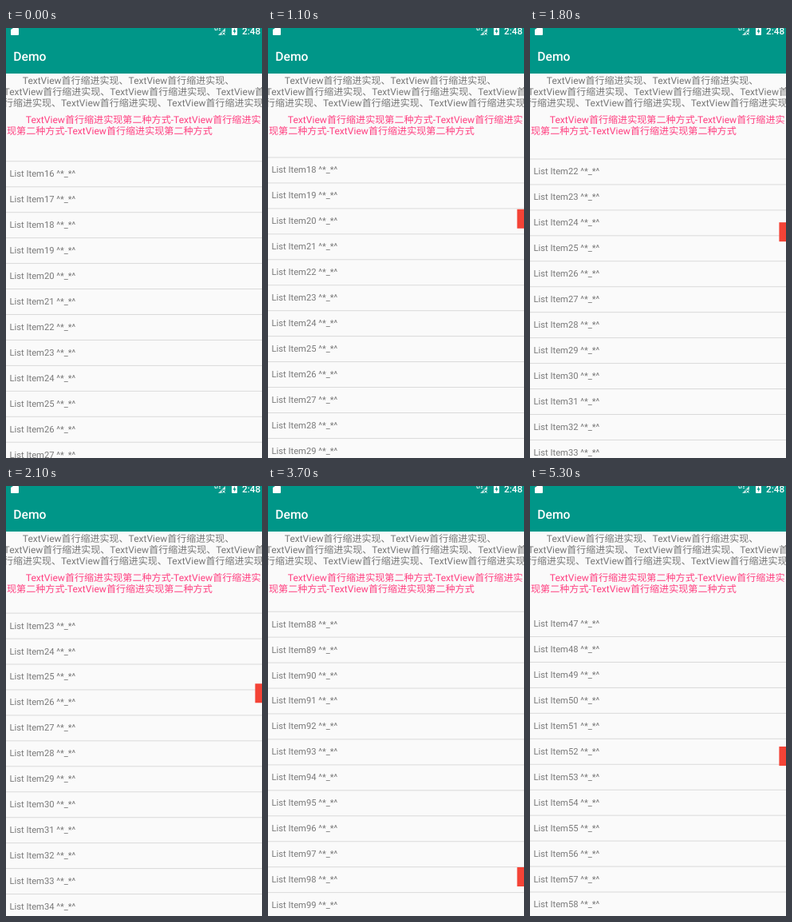
Write an HTML page that moves like this. It is 321x538 px and loops after 5900 ms.

```html
<!DOCTYPE html>
<html lang="zh-CN">
<head>
<meta charset="utf-8">
<title>Demo</title>
<style>
  html, body { margin: 0; width: 100%; height: 100%; overflow: hidden; background: #fafafa; }
  #stage {
    position: relative; width: 321px; height: 538px; overflow: hidden; background: #fafafa;
    font-family: Roboto, "Noto Sans CJK SC", "Noto Sans CJK", sans-serif;
    text-rendering: geometricPrecision; text-spacing-trim: space-all;
  }
  #stage div, #stage svg { position: absolute; white-space: pre; }
  #bar { left: 0; top: 0; width: 321px; height: 57px; background: #009688; color: #fff; }
  #bar svg { left: 0; top: 0; }
  #title { left: 9.3px; top: 26px; font-size: 15.7px; font-weight: 500; line-height: 20px; }
  #clock { left: 296px; top: -3px; font-size: 11.7px; font-weight: 500; line-height: 14px; }
  .line { font-size: 12px; line-height: 14px; color: #777; }
  .pink { font-size: 12.08px; color: #ff4081; }
  #list { left: 0; top: 156px; width: 321px; height: 382px; overflow: hidden; }
  .row {
    left: 0; top: 0; width: 316.5px; height: 31px; padding-left: 4.5px;
    border-bottom: 1px solid #dadada; font-size: 11.2px; line-height: 31px; color: #7a7a7a;
  }
  #thumb { left: 0; top: 0; width: 9px; height: 24.3px; background: #f44336; }
</style>
</head>
<body>
<div id="stage">
  <div id="bar">
    <svg width="321" height="12" fill="#fff">
      <path d="M9 0H15Q16 0 16 1V8Q16 9 15 9H7Q6 9 6 8V2Z"/>
      <path d="M275 0V9H266Z" opacity=".75"/>
      <path d="M271 5l4 4m0-4l-4 4" stroke="#009688" stroke-width="2.4"/>
      <path d="M271.5 5.5l3 3m0-3l-3 3" stroke="#fff"/>
      <path d="M262 0v2.5h2M265 0v3M267 .5h2m-2 2h2" fill="none" stroke="#fff" stroke-width=".9"/>
      <rect x="283" y="-1" width="7" height="10" rx="1"/>
      <path d="M287 0L284.7 4.7H286.2V7.6L288.5 3.2H287Z" fill="#009688"/>
    </svg>
    <div id="clock">2:48</div>
    <div id="title">Demo</div>
  </div>
  <div id="list"></div>
  <div id="thumb"></div>
</div>
<script>
const LOOP = 5900, TICK = 100;
const TOP = 157, PITCH = 31.95, TRAVEL = 357, COUNT = 100, LAST = 87.98;
const SHOW = 8, DRAG = 29;

// [tick, value]: rows scrolled by fling, then thumb y while dragged
const fling = [[7, 15.68], [11, 17.83], [15, 20.16], [21, 22.92]];
const drag = [[28, 247], [37, 477], [46, 165], [47, 165], [53, 326]];

const stage = document.getElementById('stage');
const list = document.getElementById('list');
const thumb = document.getElementById('thumb');

function add(parent, cls, text = '') {
  const el = document.createElement('div');
  el.className = cls;
  el.textContent = text;
  return parent.appendChild(el);
}

function addLine(x, y, text, cls = '') {
  const el = add(stage, 'line ' + cls, text);
  el.style.left = x + 'px';
  el.style.top = y + 'px';
}

const first = 'TextView首行缩进实现、';
const second = 'TextView首行缩进实现第二种方式';
addLine(20.8, 59, first.repeat(2));
addLine(-2.4, 73, first.repeat(2) + 'TextView首');
addLine(-3, 87, '行缩进实现、' + first + 'TextView首行缩进实现');
addLine(24.8, 108, second + '-TextView首行缩进实', 'pink');
addLine(1, 122, '现第二种方式-' + second, 'pink');

const rows = Array.from({ length: 14 }, () => add(list, 'row'));

const linear = u => u;
const soft = u => (u + u * u * (3 - 2 * u)) / 2;

function sample(keys, t, ease) {
  if (t <= keys[0][0]) return keys[0][1];
  for (let i = 1; i < keys.length; i++) {
    const [a, from] = keys[i - 1], [b, to] = keys[i];
    if (t <= b) return from + (to - from) * ease((t - a) / (b - a));
  }
  return keys[keys.length - 1][1];
}

function flingAt(t) {
  const slowing = u => 1 - (1 - u) ** 1.26;
  return sample(fling, t, t > 15 ? slowing : linear);
}

function draw(tick) {
  let scroll, y;
  if (tick < DRAG) {
    scroll = flingAt(tick);
    y = TOP + TRAVEL * Math.floor(scroll) / 87;
  } else {
    y = sample(drag, tick, soft);
    scroll = Math.min(LAST, Math.floor(COUNT * (y - TOP) / TRAVEL));
  }
  thumb.style.visibility = tick < SHOW ? 'hidden' : 'visible';
  thumb.style.transform = `translate(312.4px, ${y}px)`;

  const base = Math.floor(scroll);
  rows.forEach((row, i) => {
    const n = base + i;
    const top = TOP + PITCH * (n - scroll) - 156;
    row.textContent = `List Item${n}${n < 10 ? '' : ' '}^*_*^`;
    row.style.transform = `translateY(${top}px)`;
    row.style.visibility = n < COUNT ? 'visible' : 'hidden';
  });
}

const start = performance.now();
let shown = -1;
function frame() {
  const tick = Math.floor((performance.now() - start) % LOOP / TICK);
  if (tick !== shown) draw(shown = tick);
  requestAnimationFrame(frame);
}
frame();
</script>
</body>
</html>
```
